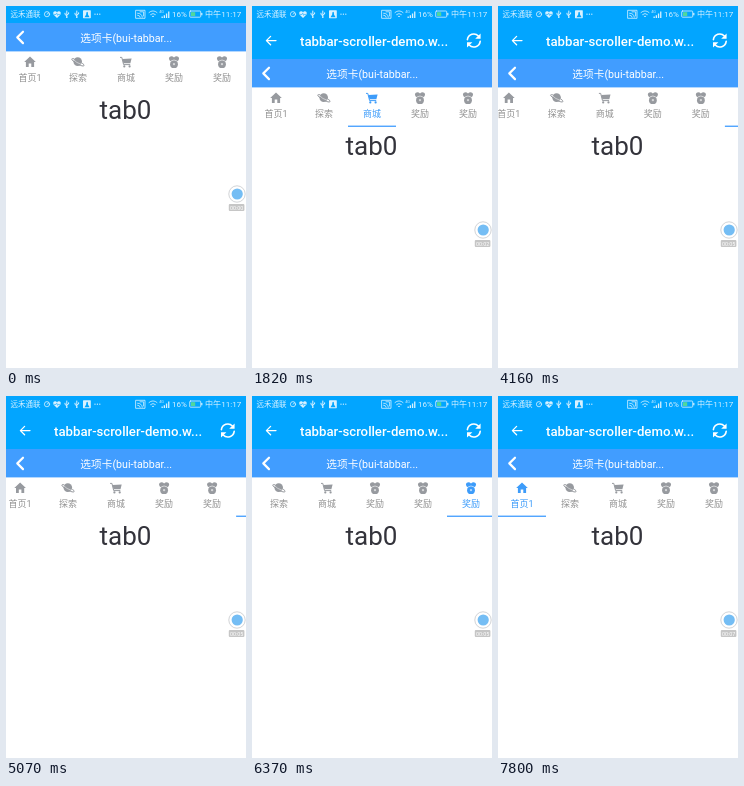
Animation of 240 by 362 pixels, one loop 8.06 s. Source, as an HTML page:

```html
<!DOCTYPE html>
<html lang="zh-CN">
<head>
<meta charset="utf-8">
<title>Tab bar</title>
<style>
  html, body { margin: 0; width: 100%; height: 100%; overflow: hidden; background: #fff; }
  svg { display: block; width: 240px; height: 362px; }
  text { font-family: Roboto, "Noto Sans CJK SC", "Noto Sans CJK", "Noto Sans", sans-serif; }
  .mid { text-anchor: middle; }
  .line { fill: none; stroke: #fff; stroke-linecap: round; stroke-linejoin: round; }
  .status { fill: #fff; opacity: .85; }
  .status .line { stroke-width: .8; }
  .tab { fill: #979a9f; color: #979a9f; }
  .tab text { font-size: 9px; fill: #929292; }
  .tab.on, .tab.on text { fill: #3d9cfa; color: #3d9cfa; }
  .stroke { fill: none; stroke: currentColor; }
</style>
</head>
<body>
<svg viewBox="0 0 240 362">
  <defs>
    <g id="home"><path d="M0-5.4 5.8.1H4.1V5H1.3V1.5H-1.3V5H-4.1V.1H-5.8Z"/></g>
    <g id="planet">
      <circle cx="-.3" cy="-.4" r="4.3"/>
      <path class="stroke" d="M-4-3.2Q-7.2-3.8-6-2.1 -3.5 1 2.2 3.3 6.2 4.7 6 3.3 5.8 2.4 4 .8" stroke-width="1"/>
      <path d="M-4.6-2.4Q-1.6.9 3.2 2.3" fill="none" stroke="#fff" stroke-width=".5"/>
    </g>
    <g id="cart">
      <path class="stroke" d="M-6-4.6H-4.2L-2.4 2.6H4.2" stroke-width="1"/>
      <path d="M-3.6-3 5.6-3.6 4.4 1.2H-2.6Z"/>
      <circle cx="-1.7" cy="4.4" r="1.1"/><circle cx="3.6" cy="4.4" r="1.1"/>
    </g>
    <g id="medal">
      <path d="M-2.8-5.8Q-1-5.8 0-4.6 1-5.8 2.8-5.8 5.2-5.6 5.1-3.2 4.8-1 2.6-.4H-2.6Q-4.8-1-5.1-3.2-5.2-5.6-2.8-5.8Z"/>
      <circle cy="2.2" r="3.9"/>
      <path d="M-2.9-1.1Q0-2.9 2.9-1.1" fill="none" stroke="#fff" stroke-width=".6"/>
      <circle cy="2.1" r="1.2" fill="#fff" opacity=".6"/>
    </g>
    <g id="usb">
      <path class="line" d="M0-3V3M-1.8-.8V.5L0 1.8M1.8-1.2V0L0 1"/>
      <circle cy="3.2" r=".8"/>
    </g>
  </defs>

  <rect width="240" height="362" fill="#fff"/>
  <rect width="240" height="54" fill="#02a5ff"/>

  <g class="status">
    <text x="4.5" y="10.9" font-size="7.5">远禾通联</text>
    <circle class="line" cx="41" cy="8.2" r="2.6"/>
    <path class="line" d="M41 8.2 42.7 6.8"/>
    <path d="M51 12 47.5 8.4Q46.6 5.3 49.2 5.2 50.5 5.2 51 6.5 51.6 5.2 52.8 5.2 55.4 5.3 54.5 8.4Z"/>
    <path d="M48 8.4H50L50.8 7.2 51.6 9.4 52.2 8.4H54" fill="none" stroke="#02a5ff" stroke-width=".6"/>
    <use href="#usb" x="60.8" y="8"/>
    <use href="#usb" x="70.8" y="8"/>
    <rect x="77" y="4.2" width="7.8" height="8" rx=".6"/>
    <path d="M78.5 11.3 80.2 8.5Q80 5.8 81.2 5.8 82.2 6 82 8.5L83.6 11.3Z" fill="#02a5ff"/>
    <circle cx="89" cy="8.2" r=".65"/><circle cx="91.4" cy="8.2" r=".65"/><circle cx="93.8" cy="8.2" r=".65"/>
    <rect class="line" x="130" y="4.3" width="9" height="8"/>
    <path class="line" d="M131.6 7.2Q136 7.3 136.3 11.2M131.6 9.2Q134 9.2 134.2 11.2M134 5.8H137.6V10"/>
    <path class="line" d="M143 6.5Q147 3.1 151 6.5M144.6 8.5Q147 6.4 149.4 8.5M146.2 10.2 147 10.8 147.8 10.2"/>
    <text x="153.2" y="7.4" font-size="3.8">4G</text>
    <path d="M155.5 12V10.6H156.8V12ZM157.7 12V9.2H159V12ZM159.9 12V7.5H161.2V12ZM162.1 12V5.5H163.4V12Z"/>
    <text x="166" y="11" font-size="8">16%</text>
    <rect class="line" x="183.7" y="5" width="11" height="6.2" rx=".8"/>
    <rect x="185" y="6.2" width="4.2" height="3.8" fill="#5fe08a"/>
    <rect x="195.2" y="6.9" width="1.2" height="2.4"/>
    <text x="199" y="11.1" font-size="8.1">中午11:17</text>
  </g>

  <path class="line" d="M24 34.6H14.5M18.6 30.4 14.4 34.6 18.6 38.8" stroke-width="1.3"/>
  <text x="48" y="39.5" font-size="13.2" font-weight="500" fill="#fff">tabbar-scroller-demo.w...</text>
  <path class="line" d="M215.4 33.6A6.4 6.4 0 0 1 226.4 30M228.2 35.4A6.4 6.4 0 0 1 217.2 39" stroke-width="1.6"/>
  <path d="M228.6 27.4V32.8H223.2ZM215 41.6V36.2H220.4Z" fill="#fff"/>

  <g id="page">
    <rect y="53" width="240" height="346" fill="#fff"/>
    <rect y="53" width="240" height="28.4" fill="#419dff"/>
    <path class="line" d="M17 61.7 11.3 67.4 17 73.1" stroke-width="2.2"/>
    <text class="mid" x="120.2" y="71.5" font-size="10.7" fill="#fff">选项卡(bui-tabbar...</text>
    <g id="strip">
      <rect id="mark" y="119.6" width="48" height="1.3" fill="#419dff"/>
    </g>
    <text class="mid" x="119.5" y="149.2" font-size="26" fill="#33333b">tab0</text>
    <circle cx="231" cy="224" r="8.2" fill="#fff" stroke="#d2d4d7" stroke-width="1"/>
    <circle cx="231.2" cy="224" r="5.6" fill="#74bdf4"/>
    <rect x="222.8" y="234" width="15.6" height="7" rx="1" fill="#c6c6c6"/>
    <text id="clock" class="mid" x="230.6" y="239.5" font-size="5.4" fill="#fff">00:00</text>
  </g>
</svg>
<script>
  const LOOP = 8060, STEP = 130, TAB = 48;
  const $ = id => document.getElementById(id);
  const page = $('page'), strip = $('strip'), mark = $('mark'), clock = $('clock');

  const items = [['home', '首页1'], ['planet', '探索'], ['cart', '商城'],
    ['medal', '奖励'], ['medal', '奖励'], ['medal', '奖励']];
  strip.insertAdjacentHTML('beforeend', items.map(([icon, label], i) => {
    const x = TAB * (i + .5);
    return `<g class="tab"><use href="#${icon}" x="${x}" y="92"/>` +
      `<text class="mid" x="${x}" y="110.9">${label}</text></g>`;
  }).join(''));
  const tabs = [...strip.querySelectorAll('.tab')];

  // [first tick, value] pairs, held until the next one
  const active = [[0, -1], [12, 2], [22, 5], [59, 0]];
  const seconds = [[0, 0], [7, 1], [14, 2], [21, 3], [24, 4], [27, 5], [52, 6], [57, 7]];
  const held = (list, k) => list.filter(([from]) => k >= from).pop()[1];

  const ramp = (k, from, to) => Math.min(1, Math.max(0, (k - from) / (to - from)));
  const smooth = p => p * p * (3 - 2 * p);
  const settle = p => (1 - p) ** 1.6;

  function scrollAt(k) {
    if (k < 22) return 0;
    if (k < 37) return 48 * settle(ramp(k, 27, 36));
    if (k < 51) return 45 * smooth(ramp(k, 37, 43.6));
    return 45 * settle(ramp(k, 51, 58));
  }

  function draw(time) {
    const k = Math.floor((time % LOOP) / STEP);
    const on = held(active, k);
    page.setAttribute('transform', `translate(0 ${k ? 0 : -36})`);
    strip.setAttribute('transform', `translate(${-scrollAt(k)} 0)`);
    mark.setAttribute('visibility', on < 0 ? 'hidden' : 'visible');
    mark.setAttribute('x', Math.max(0, on) * TAB);
    tabs.forEach((tab, i) => tab.classList.toggle('on', i === on));
    clock.textContent = '00:0' + held(seconds, k);
  }

  const start = performance.now();
  function loop() {
    draw(performance.now() - start);
    requestAnimationFrame(loop);
  }
  loop();
</script>
</body>
</html>
```
